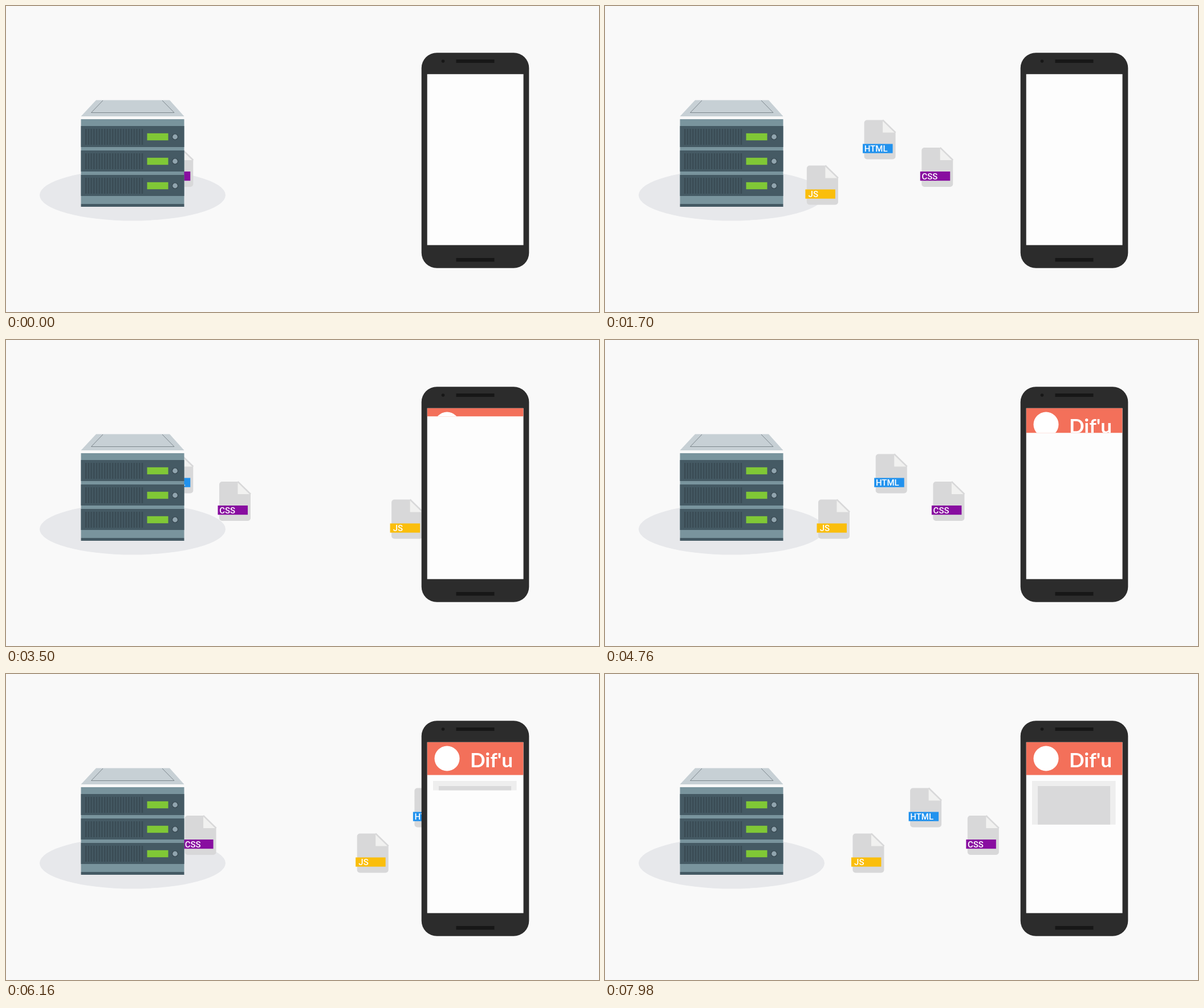
An HTML page for the animation above (8000 ms loop, 1040 by 538 pixels).

```html
<!DOCTYPE html>
<html lang="en">
<head>
<meta charset="utf-8">
<title>Page loading from a server</title>
<style>
  html, body { margin: 0; width: 100%; height: 100%; overflow: hidden; background: #f9f9f9; }
  svg { display: block; }
  .label { font: 500 15px Roboto, sans-serif; fill: #fff; }
  .brand { font: 700 35px Lato, sans-serif; fill: #fff; }
</style>
</head>
<body>
<svg width="1040" height="538" viewBox="0 0 1040 538">
  <defs>
    <clipPath id="headClip"><rect id="headReveal" x="738.7" y="119.8" width="168.8" height="0"/></clipPath>
    <clipPath id="cardClip"><rect id="cardReveal" x="738.7" y="178" width="168.8" height="0"/></clipPath>
    <pattern id="vents" x="139" width="4.7" height="27" patternUnits="userSpaceOnUse">
      <rect width="2.4" height="27" fill="#394a53"/>
    </pattern>
    <g id="sheet">
      <path d="M7.5 0H35L57.5 22V64a5 5 0 0 1-5 5H7.5a5 5 0 0 1-5-5V5a5 5 0 0 1 5-5z" fill="#d8d8d9"/>
      <path d="M35 0V22H57.5z" fill="#f1f1f0"/>
      <path d="M35 0L57.5 22" stroke="#d8d8d9" stroke-width="2.5"/>
    </g>
    <g id="unit">
      <rect x="131.5" width="181" height="37" fill="#455a64"/>
      <rect x="139" y="5" width="103" height="28" fill="url(#vents)"/>
      <rect x="247.5" y="12.8" width="37" height="12.4" fill="#80c836"/>
      <circle cx="296.5" cy="19" r="5" fill="#90a4ae" stroke="#37474f" stroke-width="1.2"/>
    </g>
  </defs>

  <rect width="1040" height="538" fill="#f9f9f9"/>
  <ellipse cx="222" cy="332.5" rx="163" ry="45" fill="#e7e8eb"/>
  <g id="files"></g>

  <g id="server">
    <path d="M158 165.5H287L312.5 194H131.5z" fill="#c7d0d5"/>
    <path d="M170 166L149.5 187.5H295L274 166" fill="none" stroke="#7d878d"/>
    <rect x="131.5" y="194" width="181" height="5" fill="#f8f8f8"/>
    <rect x="131.5" y="199" width="181" height="149" fill="#79949d"/>
    <use href="#unit" y="211"/>
    <use href="#unit" y="254"/>
    <use href="#unit" y="297"/>
    <rect x="131.5" y="348" width="181" height="5" fill="#455a64"/>
  </g>

  <g id="phone">
    <rect x="728.7" y="82.2" width="188.6" height="378.6" rx="27" fill="#2c2c2c"/>
    <circle cx="766.5" cy="97" r="2.8" fill="#171717"/>
    <rect x="789.5" y="94" width="67" height="6" fill="#171717"/>
    <rect x="789.5" y="443" width="67" height="6.5" fill="#171717"/>
    <rect x="738.7" y="119.8" width="168.8" height="300.6" fill="#fdfdfd"/>
    <g clip-path="url(#headClip)">
      <rect x="738.7" y="119.8" width="168.8" height="58" fill="#f3705a"/>
      <circle cx="773.5" cy="148.5" r="22" fill="#fff"/>
      <text class="brand" x="814" y="164">Dif'u</text>
    </g>
    <g clip-path="url(#cardClip)">
      <rect x="749" y="188" width="146.5" height="223" fill="#eeeeee"/>
      <rect x="759" y="197" width="127" height="205" fill="#d9d9da"/>
    </g>
  </g>
</svg>
<script>
const LOOP = 8000;
const LAP = 25;          // hops from server to phone
const HOP = 20.14;       // px per hop
const START_X = 270.8;
const $ = id => document.getElementById(id);

const files = [
  { name: 'CSS', color: '#880da0', y: 249, dx: 2.7, lag: 0 },
  { name: 'HTML', color: '#2192ee', y: 200.5, dx: 2.7, lag: 5 },
  { name: 'JS', color: '#fabe0c', y: 280.5, dx: 5.2, lag: 10 },
];

$('files').innerHTML = files.map(f => `
  <g id="${f.name}">
    <use href="#sheet"/>
    <rect y="42" width="52.5" height="16.2" fill="${f.color}"/>
    <text class="label" x="${f.dx}" y="55.5">${f.name}</text>
  </g>`).join('');

// Steps last 20, 100 and 20 ms in turn.
function stepAt(t) {
  const r = t % 140;
  return 3 * Math.floor(t / 140) + (r < 20 ? 0 : r < 120 ? 1 : 2);
}

function grow(id, height, max) {
  $(id).setAttribute('height', Math.min(max, Math.max(0, height)));
}

function draw(t) {
  const tick = Math.floor(stepAt(t) * 2 / 5);
  for (const f of files) {
    const pos = tick - f.lag;
    const node = $(f.name);
    node.setAttribute('visibility', pos < 0 ? 'hidden' : 'visible');
    node.setAttribute('transform', `translate(${START_X + HOP * ((pos + LAP) % LAP)} ${f.y})`);
  }
  grow('headReveal', (tick - 25) * 2.9, 58);
  grow('cardReveal', (tick - 45) * 3.77, 242);
}

const start = performance.now();
function frame() {
  draw((performance.now() - start) % LOOP);
  requestAnimationFrame(frame);
}
draw(0);
requestAnimationFrame(frame);
</script>
</body>
</html>
```
